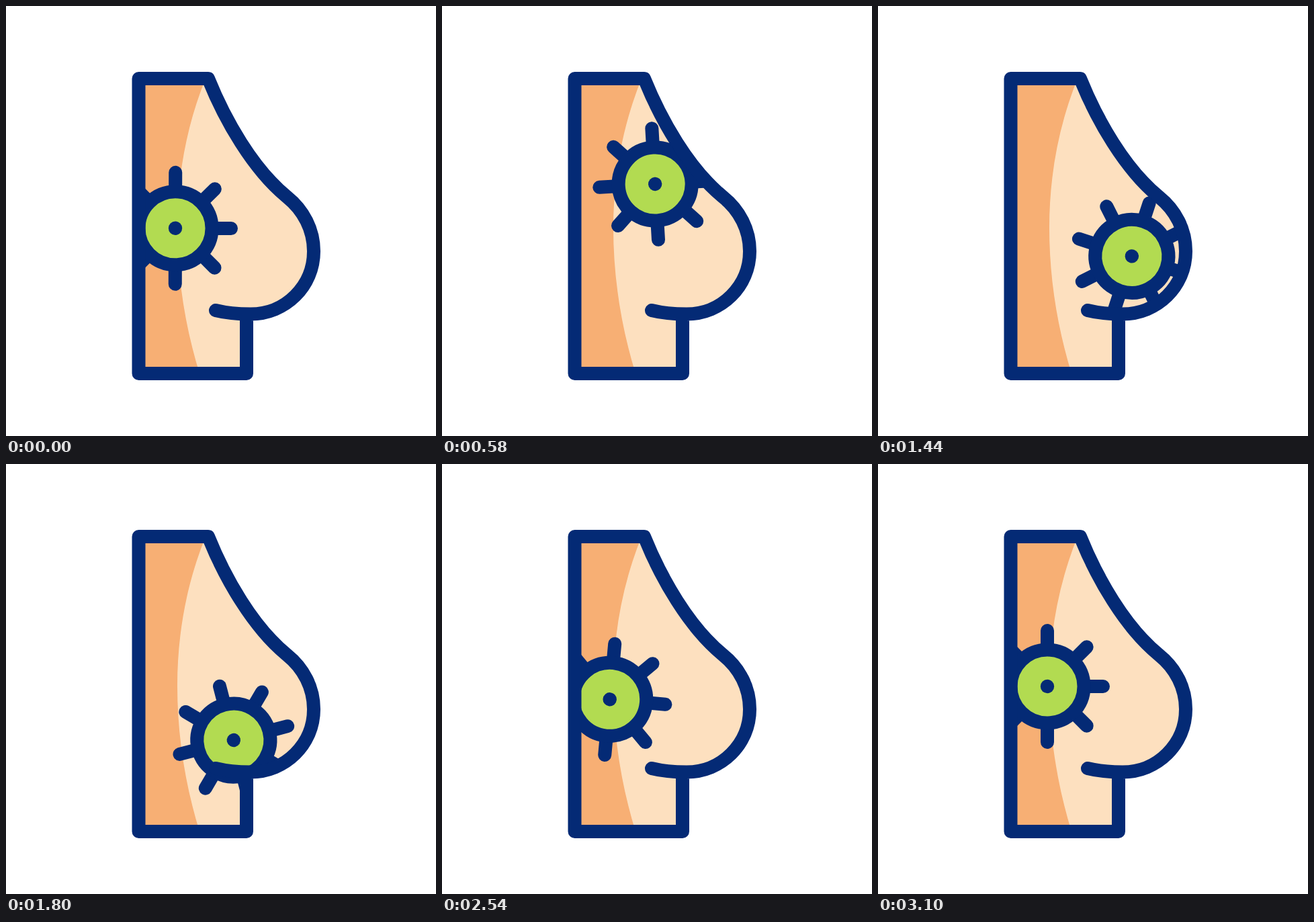
An HTML page for the animation above (3600 ms loop, 640 by 640 pixels).

```html
<!DOCTYPE html>
<html lang="en">
<head>
<meta charset="utf-8">
<title>Cell moving inside a body</title>
<style>
  html, body { margin: 0; width: 100%; height: 100%; overflow: hidden; background: #fff; }
  svg { display: block; width: 100%; height: 100%; }
  .line { fill: none; stroke: #042a75; stroke-width: 20; stroke-linecap: round; stroke-linejoin: round; }
</style>
</head>
<body>
<svg viewBox="0 0 640 640">
  <defs>
    <path id="body" d="M358 460V547H197.5V108H301C326 170 367 242 418 284C443 304 458 333 458 365C458 417 416 458.5 364 458.5C346 458.5 328 457 312 453"/>
    <clipPath id="inside">
      <path d="M358 458V547H197.5V108H301C326 170 367 242 418 284C443 304 458 333 458 365C458 417 416 458.5 364 458.5Z"/>
    </clipPath>
  </defs>
  <g clip-path="url(#inside)">
    <rect width="640" height="640" fill="#fde0bf"/>
    <path fill="#f7af74" d="M197 108H297C268 180 255 255 255 330C255 402 266 475 288 547H197Z"/>
    <g id="cell">
      <path id="spokes" class="line"/>
      <circle class="line" r="54.5" style="fill:#b2db51"/>
      <circle r="10.2" fill="#042a75"/>
    </g>
  </g>
  <use href="#body" class="line"/>
</svg>
<script>
  const LOOP = 3600;
  const RAD = Math.PI / 180;
  const cell = document.getElementById('cell');

  // Stops on the round trip; turn is the heading in degrees, clockwise from up.
  const stops = [
    { time: 0, x: 252, y: 331, turn: 0 },
    { time: 580, x: 317, y: 265, turn: 86.5 },
    { time: 1080, x: 378, y: 311, turn: 164.8 },
    { time: 1800, x: 339, y: 411, turn: 255.4 },
    { time: 2200, x: 276, y: 402, turn: 323.8 },
    { time: 2540, x: 249.7, y: 350.5, turn: 365 },
    { time: 3100, x: 252, y: 331, turn: 360 }
  ];

  const polar = (radius, degrees) =>
    [radius * Math.sin(degrees * RAD), -radius * Math.cos(degrees * RAD)];

  document.getElementById('spokes').setAttribute('d',
    Array.from({ length: 8 }, (_, i) => `M${polar(58, i * 45)}L${polar(83, i * 45)}`).join(''));

  // Cubic arc between two stops that leaves and arrives along their headings.
  function pose(from, to, u) {
    const chord = Math.hypot(to.x - from.x, to.y - from.y);
    const reach = chord / (3 * Math.cos((to.turn - from.turn) * RAD / 4) ** 2);
    const out = polar(reach, from.turn);
    const into = polar(reach, to.turn);
    const v = 1 - u;
    const axis = (a, d) => {
      const b = a.start + d.out, c = a.end - d.into;
      return {
        at: v ** 3 * a.start + 3 * v * v * u * b + 3 * v * u * u * c + u ** 3 * a.end,
        speed: v * v * (b - a.start) + 2 * v * u * (c - b) + u * u * (a.end - c)
      };
    };
    const x = axis({ start: from.x, end: to.x }, { out: out[0], into: into[0] });
    const y = axis({ start: from.y, end: to.y }, { out: out[1], into: into[1] });
    return { x: x.at, y: y.at, turn: Math.atan2(x.speed, -y.speed) / RAD };
  }

  function render(time) {
    const last = stops.length - 1;
    const t = Math.min(time % LOOP, stops[last].time);
    let i = 1;
    while (i < last && t > stops[i].time) i++;
    const from = stops[i - 1], to = stops[i];
    let u = (t - from.time) / (to.time - from.time);
    if (i === last) u = 1 - (1 - u) ** 5;
    const { x, y, turn } = pose(from, to, u);
    cell.setAttribute('transform', `translate(${x} ${y}) rotate(${turn})`);
  }

  const begin = performance.now();
  function tick() {
    render(performance.now() - begin);
    requestAnimationFrame(tick);
  }
  tick();
</script>
</body>
</html>
```
